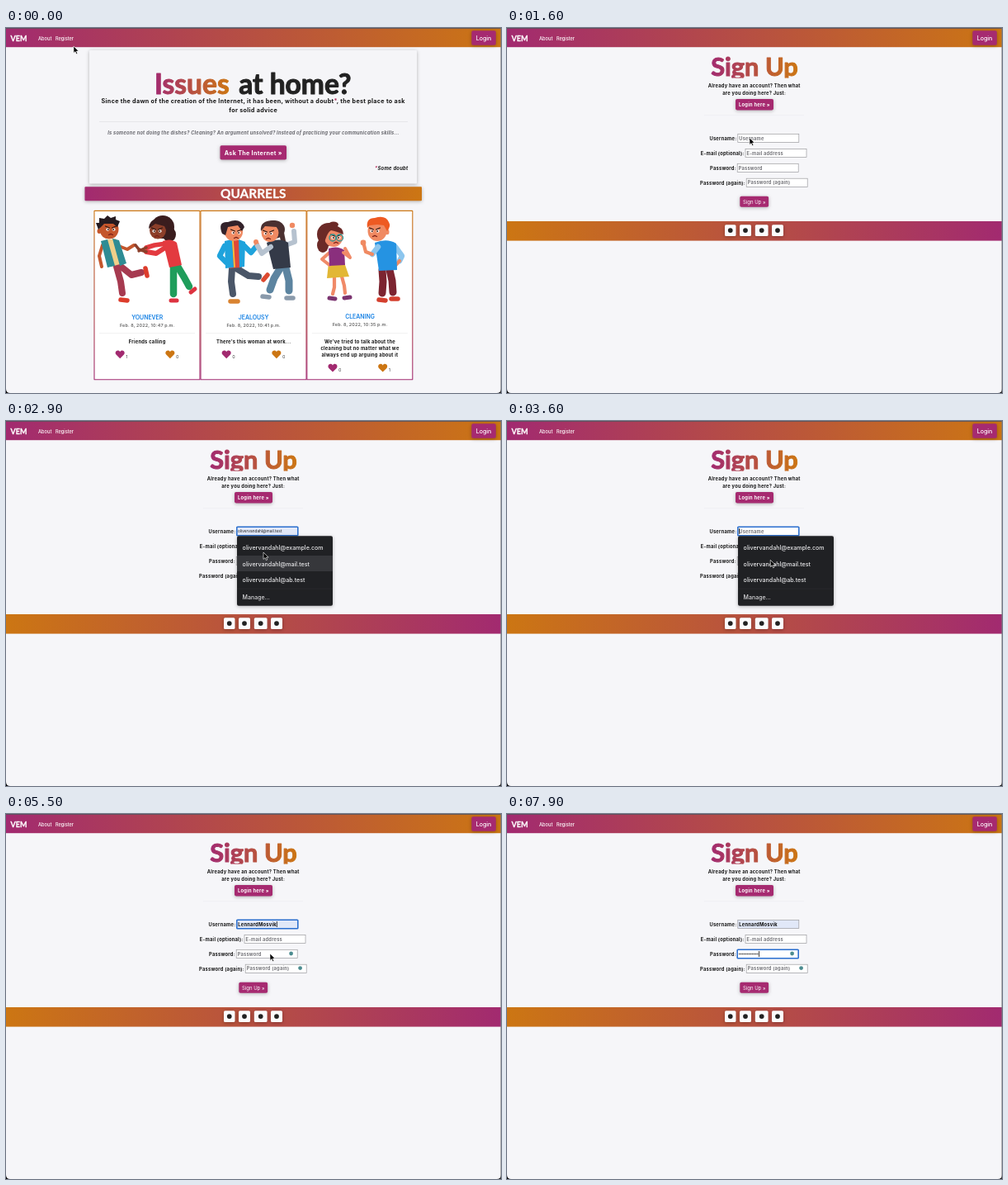
These frames come from a looping animation (600x442 px, 8000 ms). An HTML page:

```html
<!DOCTYPE html>
<html lang="en">
<head>
<meta charset="utf-8">
<title>Sign up walkthrough</title>
<style>
html, body { margin: 0; width: 100%; height: 100%; overflow: hidden; background: #f6f6f9; }
svg { display: block; width: 600px; height: 442px; }
text { font-family: Inter, "Open Sans", sans-serif; white-space: pre; }
.b { font-weight: 700; letter-spacing: .042em; }
.bi { font-weight: 700; letter-spacing: .042em; font-style: italic; }
.m { font-weight: 500; }
.t { font-weight: 600; }
.s { font-weight: 600; letter-spacing: .03em; }
.h { font-family: Lato, "Open Sans", sans-serif; font-weight: 700; stroke-linejoin: round; }
.sh { filter: drop-shadow(0 1.5px 2px rgba(0,0,0,.28)); }
</style>
</head>
<body>
<svg id="stage" viewBox="0 0 600 442"></svg>
<script>
const PURPLE = '#a22a70', ORANGE = '#cc7613', INK = '#161616', LOOP = 8000;
const USER = 'LennardMosvik', TYPED = 7;
const MAILS = ['olivervandahl@example.com', 'olivervandahl@mail.test', 'olivervandahl@ab.test'];

const text = (x, y, size, str, cls = '', fill = INK, anchor = 'start', extra = '') =>
  `<text x="${x}" y="${y}" font-size="${size}" class="${cls}" fill="${fill}" text-anchor="${anchor}" ${extra}>${str}</text>`;
const mid = (x, y, size, str, cls, fill) => text(x, y, size, str, cls, fill, 'middle');
// Rounded, heavier display lettering
const display = (x, y, size, str, fill, anchor, weight = 1) =>
  text(x, y, size, str, 'h', fill, anchor, `stroke="${fill}" stroke-width="${weight}"`);
const rect = (x, y, w, h, fill, r = 0, extra = '') =>
  `<rect x="${x}" y="${y}" width="${w}" height="${h}" rx="${r}" fill="${fill}" ${extra}/>`;
const oval = (fill, x, y, rx, ry = rx) => `<ellipse cx="${x}" cy="${y}" rx="${rx}" ry="${ry}" fill="${fill}"/>`;
const limb = (color, w, pts) =>
  `<polyline points="${pts}" fill="none" stroke="${color}" stroke-width="${w}" stroke-linecap="round" stroke-linejoin="round"/>`;
const shape = (fill, d) => `<path d="${d}" fill="${fill}"/>`;
const group = (id, body) => `<g id="${id}">${body}</g>`;
const ramp = (id, a, b, dir) =>
  `<linearGradient id="${id}" ${dir}><stop offset="0" stop-color="${a}"/><stop offset="1" stop-color="${b}"/></linearGradient>`;
const heart = (x, y, fill) =>
  `<path transform="translate(${x} ${y})" d="M0 5L-4.7 .4C-7.4-2.6-3-7-0-3.1C3-7 7.4-2.6 4.7 .4Z" fill="${fill}"/>`;
const button = (x, y, w, h) => rect(x, y, w, h, '#a62a70', 1.8, 'class="sh"');

// Angry brows, eyes and mouth around a head centre
const face = (x, y) =>
  oval('#fff', x - 3.6, y, 2, 1.7) + oval('#fff', x + 3.6, y, 2, 1.7) +
  oval('#3a1d16', x - 3.2, y, 1) + oval('#3a1d16', x + 3.2, y, 1) +
  limb('#2c1712', 1.2, `${x - 6.5},${y - 4} ${x - 1.6},${y - 2}`) +
  limb('#2c1712', 1.2, `${x + 6.5},${y - 4} ${x + 1.6},${y - 2}`) +
  limb('#7d2018', 1.3, `${x - 2.5},${y + 6.5} ${x},${y + 5.3} ${x + 2.5},${y + 6.5}`);

const kickingBoy = () =>
  limb('#c4562c', 4, '117,263 113,276 116,289') + limb('#a63a50', 8, '134,289 139,307 141,321') +
  limb('#a63a50', 8, '137,287 152,299 164,296') + limb('#dd3d2c', 5.5, '139,329 147,330') +
  limb('#dd3d2c', 5.5, '169,291 171,300') + limb('#c4562c', 4, '134,263 147,268 155,263') +
  shape('#f0d08a', 'M119 257L133 255L142 285L127 289Z') +
  shape('#2f8c94', 'M115 258L123 256L132 288L123 290ZM129 255L137 257L146 285L138 288Z') +
  oval('#c4562c', 125, 244, 11.5, 11.5) + oval('#c4562c', 113, 246, 2.5, 3) +
  shape('#261b20', 'M112 244L109 236L113 236L113 230L119 231L123 227L127 230L133 228L133 232L138 234L135 241L130 237L119 237Z') +
  face(127, 244);

const pushingGirl = () =>
  oval('#3a1d1e', 190, 241, 14, 14) + oval('#3a1d1e', 198, 250, 8, 9) +
  limb('#1f9d5b', 8.5, '203,287 203,305 203,322') + limb('#1f9d5b', 8.5, '207,287 216,302 222,313') +
  limb('#dd3340', 5, '200,330 207,330') + limb('#dd3340', 5, '224,320 229,316') +
  limb('#e33a3f', 6, '196,264 182,273 170,271') + limb('#8c3f2a', 3.6, '170,271 161,268 157,263') +
  limb('#e33a3f', 5.5, '194,261 180,263 170,266') + limb('#8c3f2a', 3.4, '170,266 161,270') +
  shape('#e33a3f', 'M190 258Q200 254 207 260L213 287L198 290Z') +
  oval('#8c3f2a', 184, 245, 10, 10.5) + shape('#3a1d1e', 'M173 243Q174 229 190 231Q199 235 197 250L192 240L181 237Z') + face(183, 246);

const jacketBoy = () =>
  limb('#4a5668', 8, '274,291 273,307 275,322') + limb('#4a5668', 8, '279,291 294,300 306,301') +
  limb('#d98330', 5.5, '272,331 281,331') + limb('#dd4a30', 5.5, '312,305 317,299') +
  limb('#1fa3dc', 6.5, '265,264 259,276 267,284') +
  shape('#e0483a', 'M269 257L285 257L286 290L270 291Z') +
  shape('#1fa3dc', 'M265 258L274 256L276 290L266 291ZM282 256L290 259L289 289L283 290Z') +
  limb('#f2c33f', 1.8, '275,258 277,289') + limb('#1fa3dc', 6.5, '288,263 297,272 302,266') +
  oval('#f08a62', 304, 262, 3) + oval('#f08a62', 276, 247, 11, 11) +
  shape('#33222a', 'M262 249Q256 234 269 235Q284 229 289 241L286 246L281 239L269 241L266 251Z') + face(279, 248);

const darkJacketKid = () =>
  oval('#4a3030', 325, 244, 13, 11) + limb('#4a3030', 6, '333,243 336,258') +
  limb('#5c84a0', 9, '333,290 325,303 320,317') + limb('#5c84a0', 9, '339,290 343,306 343,318') +
  limb('#8a9aab', 5.5, '311,325 319,326') + limb('#8a9aab', 5.5, '340,327 348,327') +
  limb('#b6c2cf', 6, '339,263 350,259 349,246') + oval('#f08a62', 347, 239, 3.2) +
  shape('#343a48', 'M316 260Q332 253 342 260L345 290L324 292Z') +
  limb('#b6c2cf', 6, '321,265 310,273 305,264') + oval('#f08a62', 303, 259, 3) +
  oval('#f08a62', 320, 248, 10.5, 11) + shape('#4a3030', 'M309 246Q307 233 325 233Q337 236 334 251L328 241L314 240Z') +
  face(318, 249);

const glassesGirl = () =>
  oval('#6b2a27', 391, 250, 14, 14) + oval('#6b2a27', 384, 263, 7, 9) + oval('#6b2a27', 397, 238, 6, 3.5) +
  limb('#f08a68', 4.2, '398,301 398,314 396,322') + limb('#f08a68', 4.2, '407,301 410,312 411,321') +
  limb('#7b3470', 5, '392,327 399,328') + limb('#7b3470', 5, '410,327 417,326') +
  shape('#e2b735', 'M391 285L410 284L416 301L389 303Z') +
  limb('#f08a68', 4, '392,272 383,280 392,287') +
  shape('#8a2f7d', 'M391 267Q402 263 410 269L411 287L392 288Z') +
  limb('#f08a68', 4, '409,272 417,278 411,267') + oval('#f08a68', 397, 254, 11, 11) +
  shape('#6b2a27', 'M383 254Q385 238 398 239Q409 241 409 250Q400 246 394 245Q389 248 386 260Z') + face(400, 254) +
  `<g fill="none" stroke="#2c9694" stroke-width="1.3"><circle cx="396" cy="254" r="4"/><circle cx="404.5" cy="254" r="4"/></g>`;

const redheadBoy = () =>
  limb('#7c2430', 9, '456,293 457,307 456,321') + limb('#7c2430', 9, '465,293 468,306 469,320') +
  limb('#d4402f', 5.5, '452,329 460,330') + limb('#d4402f', 5.5, '467,328 475,328') +
  limb('#8cc6ee', 6.5, '472,265 480,276 477,282') + limb('#f08a62', 4.2, '477,282 471,289') +
  shape('#2593e2', 'M447 260Q462 254 473 261L474 293L452 294Z') +
  limb('#8cc6ee', 6.5, '451,265 444,274') + limb('#f08a62', 4.2, '444,274 436,271 434,263') + oval('#f08a62', 433, 260, 3.4) +
  oval('#f08a62', 450, 246, 11.5, 12) + oval('#f08a62', 462, 247, 2.5, 3.2) +
  shape('#ee5a22', 'M438 242Q436 230 447 230Q460 226 464 235Q467 240 462 246L458 239L450 238L441 239Z') + face(447, 246);

const card = (x, title, titleY, time, lines, likes, likeY, art) => {
  const c = x + 64.2;
  return rect(x, 221.4, 128, 204.4, '#fff', .4, 'stroke="url(#down)" stroke-width="1.1"') + art +
    mid(c, titleY, 6.9, title, 't', '#1580e4') +
    mid(c, titleY + 8.6, 5.4, `Feb. 8, 2022, ${time} p.m.`, 's', '#666') +
    rect(x + 6, 369.5, 116, .6, '#e6e6e8') +
    lines.map((l, n) => mid(c, 381.6 + n * 8.3, 5.75, l, 'b')).join('') +
    heart(c - 33, likeY, PURPLE) + text(c - 26, likeY + 4.3, 5.4, likes[0], '', '#444') +
    heart(c + 27.7, likeY, ORANGE) + text(c + 34.7, likeY + 4.3, 5.4, likes[1], '', '#444');
};

const home =
  rect(101, 27, 397, 161.5, '#f5f5f8', 1, 'class="sh"') +
  display(180, 80, 33.6, 'Issues', 'url(#across)') + display(418.5, 80, 33.6, 'at home?', '#222', 'end') +
  mid(299.7, 91, 7.2, 'Since the dawn of the creation of the Internet, it has been, without a doubt<tspan fill="#b5305f">*</tspan>, the best place to ask', 'b') +
  mid(299.7, 102, 7.2, 'for solid advice', 'b') + rect(113, 113, 374, .7, '#e0e0e4') +
  mid(300, 129, 5.65, 'Is someone not doing the dishes? Cleaning? An argument unsolved? Instead of practicing your communication skills...', 'bi', '#66666c') +
  button(259.5, 142.3, 80.5, 17.2) + mid(299.8, 153.6, 7.2, 'Ask The Internet »', 'b', '#fff') +
  text(487.5, 172, 5.9, '<tspan fill="#b5305f">*</tspan>Some doubt', 'bi', INK, 'end') +
  rect(95.5, 192.3, 408.5, 17, 'url(#across)', 1, 'class="sh"') + display(299.7, 205.8, 15.4, 'QUARRELS', '#fff', 'middle', .3) +
  card(107, 'YOUNEVER', 353, '10:47', ['Friends calling'], [1, 0], 395.2, kickingBoy() + pushingGirl()) +
  card(236, 'JEALOUSY', 353, '10:41', ['There\'s this woman at work...'], [0, 0], 395.2, jacketBoy() + darkJacketKid()) +
  card(364.8, 'CLEANING', 352.2, '10:35', ['We\'ve tried to talk about the', 'cleaning but no matter what we', 'always end up arguing about it'],
    [0, 1], 411.5, glassesGirl() + redheadBoy()) +
  group('status', rect(0, 431.5, 106, 11, '#12323a', 1) + text(3, 439.3, 6.4, '127.0.0.1:8000/accounts/signup/', 'm', '#fff'));

const field = (labelX, x, y, label, hint, id) =>
  text(labelX, y + 7.4, 5.75, label, 'b', INK, 'end') +
  rect(x, y, 74, 10.2, '#fff', 0, `id="${id}" stroke="#9b9b9f" stroke-width=".7"`) +
  text(x + 1.5, y + 7.2, 5.65, hint, 'b', '#75757a', 'start', `id="${id}Hint"`);

const social = [[264, 13.5], [282, 14], [300.8, 15.8], [321, 14]].map(([x, w]) =>
  rect(x, 238.2, w, 13.8, '#fbfbfc', 1.6, 'class="sh"') + oval('#222', x + w / 2, 245.1, 2.9)).join('');

const signup =
  `<g clip-path="url(#trim)">${display(300, 58, 30.8, 'Sign Up', 'url(#across)', 'middle')}</g>` +
  mid(299.7, 72, 5.75, 'Already have an account? Then what', 'b') + mid(299.7, 80.7, 5.75, 'are you doing here? Just:', 'b') +
  button(277, 86, 46, 13.4) + mid(299.9, 94.8, 5.75, 'Login here »', 'b', '#fff') +
  rect(239, 105.5, 121, .6, '#ececf0') +
  field(278.4, 279.8, 128.3, 'Username:', 'Username', 'user') +
  field(287.6, 289, 146.4, 'E-mail (optional):', 'E-mail address', 'mail') +
  field(277.8, 279.2, 164.3, 'Password:', 'Password', 'pass') +
  field(288.8, 290.2, 182.2, 'Password (again):', 'Password (again)', 'again') +
  button(282.3, 203.8, 34.8, 13) + mid(299.7, 212.5, 6, 'Sign Up »', '', '#fff') +
  rect(0, 234, 600, 23.6, 'url(#back)') + social +
  group('helpers', oval('#4c8c90', 345.6, 169, 2.4) + oval('#4c8c90', 356.6, 186.6, 2.4)) +
  text(281.3, 135.5, 5.75, '', 'b', '#111', 'start', 'id="name"') + text(281, 135.3, 4.75, '', '', '#222', 'start', 'id="preview"') +
  group('dots', '') + rect(279.8, 128.3, 74, 10.4, 'none', .8, 'id="ring" stroke="#2a6fd0" stroke-width="1.5"') +
  rect(0, 0, .8, 7, '#111', 0, 'id="caret"') +
  group('mails', rect(280, 139.2, 116, 84.6, '#202124', 2, 'class="sh"') +
    rect(280, 163, 116, 19, '#36373b', 0, 'id="hover"') +
    MAILS.map((m, n) => text(286.6, 156.2 + n * 19.4, 7.1, m, 'm', '#e9e9eb')).join('') +
    rect(280, 202.8, 116, .5, '#303136') + text(286.6, 215.6, 7, 'Manage...', 'm', '#d8d8da')) +
  group('match', rect(280, 139.2, 103, 28, '#202124', 2, 'class="sh"') +
    rect(280, 144, 103, 19, '#36373b', 0, 'id="pick"') + text(286.6, 156.2, 7.1, USER, 'm', '#e9e9eb'));

const nav =
  rect(0, 0, 600, 23.2, 'url(#across)') + rect(0, 0, 600, .8, '#55505a') +
  display(5.5, 16, 9, 'VEM', '#fff', 'start', .3) +
  text(39, 14.7, 5.7, 'About', 'm', '#fff') + text(60, 14.7, 5.6, 'Register', 'm', '#fff') +
  button(564.3, 3.2, 29.5, 17.6) + mid(579, 14.8, 7.1, 'Login', 'm', '#fff');

const corners = shape('#000', 'M0 442V437Q0 442 5 442ZM600 442V437Q600 442 595 442Z') + rect(599.5, 0, .5, 442, '#777');
const arrow = `<path id="arrow" d="M0 0V8.4L2 6.6L3.3 9.6L4.7 9L3.4 6.1H6.1Z" fill="#000" stroke="#fff" stroke-width=".6"/>`;

const stage = document.getElementById('stage');
stage.innerHTML = `<defs>${ramp('across', PURPLE, ORANGE, '')}${ramp('back', ORANGE, PURPLE, '')}
  ${ramp('down', ORANGE, PURPLE, 'gradientUnits="userSpaceOnUse" x1="0" y1="221" x2="0" y2="426"')}
  <clipPath id="trim"><rect x="200" y="30" width="200" height="30.6"/></clipPath></defs>` +
  rect(0, 0, 600, 442, '#f6f6f9') + group('home', home) + group('signup', signup) + nav + corners + arrow;

const $ = id => document.getElementById(id);
const show = (id, on) => $(id).setAttribute('display', on ? 'inline' : 'none');
const set = (id, attrs) => { for (const k in attrs) $(id).setAttribute(k, attrs[k]); };

const PATH = [[0, 82, 22], [300, 70, 12], [500, 71, 13], [650, 140, 70], [800, 224, 125], [1100, 280, 134],
  [1600, 294, 133], [2000, 300, 134], [2500, 314, 168], [2900, 312, 159], [3300, 317, 166], [3700, 320, 169], [LOOP, 320, 169]];
const between = (a, t, b) => t >= a && t < b;

function pointer(t) {
  const n = PATH.findIndex(p => p[0] > t), [t0, x0, y0] = PATH[n - 1], [t1, x1, y1] = PATH[n];
  const k = (t - t0) / (t1 - t0);
  return [x0 + (x1 - x0) * k, y0 + (y1 - y0) * k];
}

function draw(t) {
  const onHome = t < 1000, focused = t >= 2000, onPass = t >= 6000;
  show('home', onHome);
  show('signup', !onHome);
  show('status', between(300, t, 1000));
  set('arrow', { transform: `translate(${pointer(t)})` });
  show('arrow', t < 5600);

  const typed = t < 4000 ? 0 : Math.min(TYPED, 1 + Math.floor((t - 4000) / 140));
  const filled = t >= 5500, hovering = between(2400, t, 3100), picking = between(5200, t, 5500);
  const count = t < 6500 ? 0 : Math.min(12, 1 + Math.round((t - 6500) * 11 / 1400));
  const name = filled || picking ? USER : USER.slice(0, typed);

  $('name').textContent = name;
  $('preview').textContent = hovering ? MAILS[1] : '';
  set('user', { fill: filled || picking || hovering ? '#e1e8f8' : '#fff' });
  show('userHint', !name && !hovering);
  show('passHint', !count);
  show('helpers', focused);
  show('mails', focused && !typed);
  show('hover', hovering);
  show('match', typed > 0 && !filled);
  show('pick', picking);

  show('ring', focused);
  set('ring', onPass ? { x: 279.2, y: 164.3 } : { x: 279.8, y: 128.3 });
  $('dots').innerHTML = Array.from({ length: count }, (_, n) => oval('#111', 281.8 + n * 2, 169.5, .68)).join('');
  show('caret', focused && !hovering);
  set('caret', onPass ? { x: 281 + count * 2, y: 166 } : { x: 281.3 + (name ? $('name').getComputedTextLength() : 0), y: 130 });
}

const start = performance.now();
function tick() {
  draw((performance.now() - start) % LOOP);
  requestAnimationFrame(tick);
}
tick();
</script>
</body>
</html>
```
